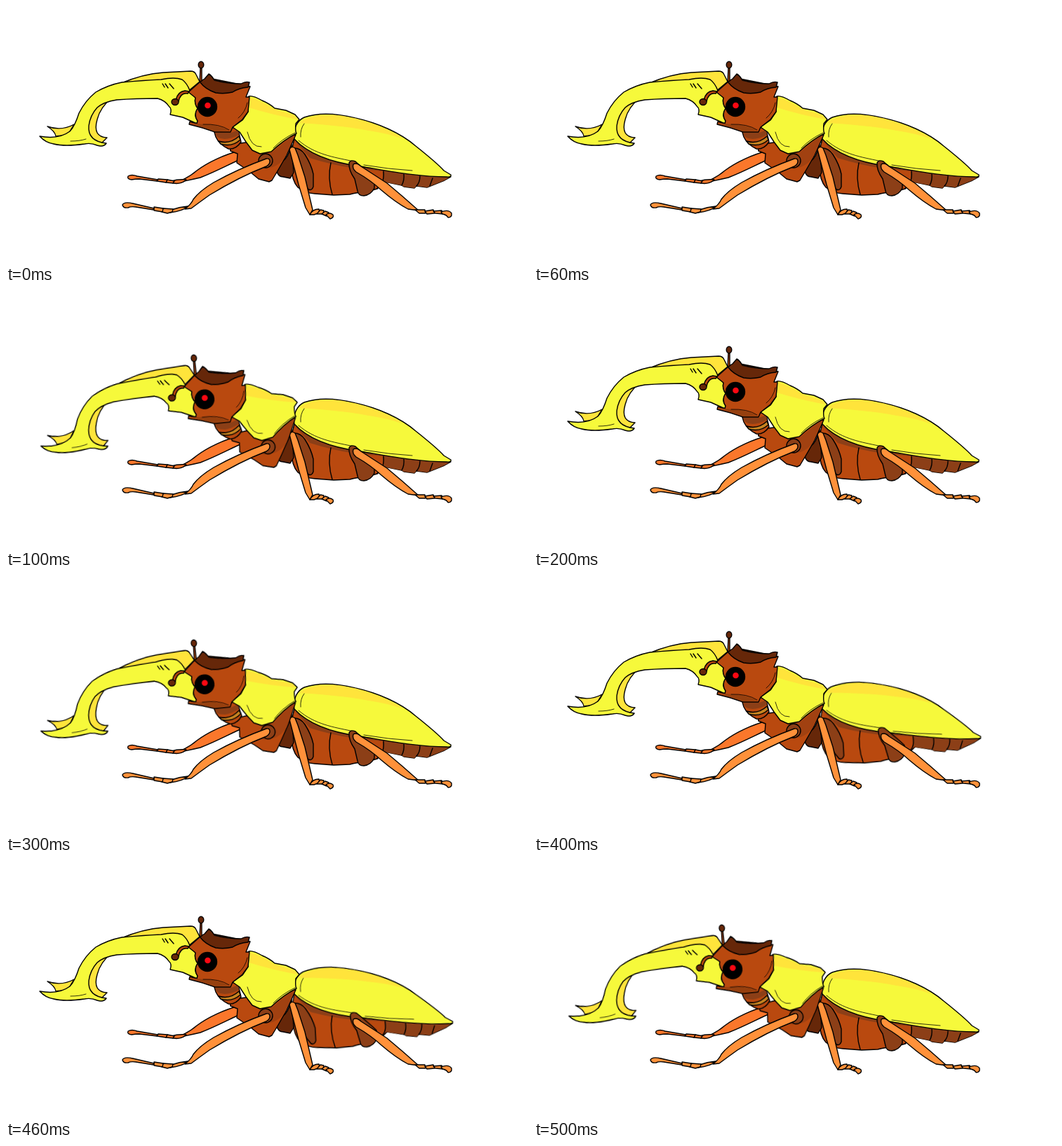
Recreate the animation shown at these times as an HTML page without scripts. Size 744 by 367 pixels, loop 0.6 s.

```html
<!DOCTYPE html>
<html lang="en">
<head>
<meta charset="utf-8">
<title>Beetle</title>
<style>
  html, body { margin: 0; width: 100%; height: 100%; overflow: hidden; background: #fff; }
  svg { display: block; width: 100vw; height: 100vh; }
  path, circle, ellipse { stroke: #000; stroke-width: 1.4; stroke-linejoin: round; stroke-linecap: round; }
  .yellow { fill: #f6f93b; }
  .gold { fill: #ffe43b; }
  .brown { fill: #b9490f; }
  .rust { fill: #8c3f17; }
  .dark { fill: #662709; }
  .leg { fill: #ff913a; }
  .far { fill: #fb772b; }
  .line { fill: none; }
  .thin { fill: none; stroke-width: .8; }
  .flat { stroke: none; }
  .front { animation: nod .2s step-end infinite; }
  .rear { transform-origin: 412px 190px; animation: lift .6s step-end infinite; }
  .front { transform-origin: 0 0; }
  @keyframes nod {
    0% { transform: none; }
    50% { transform: translate(-17.5px, 41.5px) rotate(-6deg); }
  }
  @keyframes lift {
    0% { transform: none; }
    66.667% { transform: rotate(-3.1deg); }
    83.333% { transform: none; }
  }
</style>
</head>
<body>
<svg viewBox="0 0 744 367" preserveAspectRatio="none">
  <!-- far front leg -->
  <g class="far">
    <path d="M332 207C312 212 288 223 272 235Q264 242 252 248L250 251Q264 248 277 245C300 236 318 226 334 219Z"/>
    <path d="M257 248Q245 247 236 250L238 253Q250 255 257 248Z"/>
    <path d="M240 250L230 248 228 252 238 253Z"/>
    <path d="M230 248L217 247 215 250 228 252Z"/>
    <path d="M216 248L187 243Q179 240 174 243Q172 247 179 248Q184 247 190 247L215 250Z"/>
  </g>

  <!-- abdomen -->
  <g class="rear">
    <path class="brown" d="M411 190C404 214 404 246 416 259Q426 267 440 268L467 270 490 269Q500 266 512 266L529 261 540 251 564 256 567 258 582 260 585 257 600 259 625 249 634 244 600 232 500 215Z"/>
    <path class="rust flat" d="M412 193L433 217Q465 227 492 231L537 236V251L564 256 567 258 582 260 585 257 600 259 625 249 633 244 540 230Z"/>
    <path class="line" d="M463 224Q458 246 465 269M538 236Q539 246 536 252L529 261M567 240Q568 249 564 256M590 243Q590 252 585 257M608 246L604 257"/>
    <path class="rust" d="M411 203Q420 203 426 212Q435 226 438 240V258Q436 264 431 262L420 247Z"/>
    <path class="yellow" d="M411 190C408 175 416 163 425 159C445 152 470 153 498 160C530 167 562 181 584 200C604 216 618 228 624 235L634 241Q635 245 628 244C588 244 548 236 505 229C468 224 432 213 411 190Z"/>
    <path class="gold flat" d="M418 167Q436 152 473 156C507 160 543 173 567 190Q545 182 517 178C480 171 448 169 418 167Z"/>
    <path class="thin" d="M425 168Q419 176 420 187M417 192C440 212 468 216 491 221M510 227Q545 233 579 235"/>
    <path class="rust" d="M489 224Q491 219 498 222Q516 238 525 248L525 260Q520 270 510 271Q502 271 501 264L497 247Q488 234 489 224Z"/>
  </g>

  <path class="dark" d="M407 198Q402 217 394 222L386 236Q388 244 395 244L405 246 410 238Z"/>

  <!-- middle and hind legs -->
  <g class="leg">
    <path d="M404 205Q406 199 412 203L416 213 426 244 437 291 433 298 427 288 417 255Z"/>
    <path d="M433 298Q437 290 446 290L447 295 439 298Z"/>
    <path d="M443 297L448 291 453 292 452 297Z"/>
    <path d="M450 297L455 293 460 295 457 300Z"/>
    <path d="M456 298Q461 294 466 298Q468 302 462 304Z"/>
    <path d="M495 226Q500 223 506 229L543 253Q567 273 588 292L573 290Q556 281 535 263Q520 249 499 237Q493 232 495 226Z"/>
    <path d="M583 291L597 291 598 296 589 296Z"/>
    <path d="M597 293L609 291 611 296 600 297Z"/>
    <path d="M609 293L621 292 623 297 612 296Z"/>
    <path d="M620 294Q631 290 635 296Q636 302 630 302Q628 298 622 297Z"/>
  </g>

  <!-- head and thorax -->
  <g class="front">
    <path class="brown" d="M318 198L320 207 330 211 329 224 348 237 360 247 375 251 379 249 388 234 400 213 413 184 380 190Z"/>
    <path class="flat" fill="#a14111" d="M362 211L379 209 412 182 397 217Q384 235 360 231Z"/>
    <path class="brown" d="M296 177L299 187Q304 198 317 204Q328 205 335 194L330 173Z"/>
    <path class="rust flat" d="M298 181L321 181 331 177 332 184Q312 194 301 187Z"/>
    <path d="M303 193Q319 198 332 186L334 191Q322 202 306 197Z" fill="#c78421"/>
    <path class="yellow" d="M346 129Q351 127 365 135Q375 139 383 146L399 149 412 155 418 162 413 168Q412 179 414 182Q396 191 378 208L362 211 351 206 342 194 333 180 323 173 337 163 345 151Z"/>
    <path class="gold flat" d="M348 131Q360 133 382 147L411 156 416 162Q382 156 346 145Z"/>
    <path class="thin" d="M344 180Q349 202 364 201M381 203Q393 190 412 181"/>
    <circle class="rust" cx="370" cy="221" r="10"/>

    <path class="gold" d="M162 111Q195 97 224 95L263 93Q269 93 271 98L276 108 258 123 240 108Z"/>
    <path class="gold" d="M59 172Q79 179 97 169L88 184 71 186Q70 179 59 172Z"/>
    <path class="gold" d="M151 131Q134 145 130 162Q123 187 144 188L137 195 120 193 112 175 124 146Z"/>
    <path class="yellow" d="M48 186Q75 191 91 179Q98 172 104 153Q113 135 128 123Q145 113 165 109Q198 106 221 105Q240 101 251 105Q258 110 262 121L270 131Q268 139 273 146Q267 156 273 164L272 168 252 159 234 155Q237 147 232 143Q227 135 216 132Q185 132 158 134Q139 137 130 145Q120 156 118 171Q116 193 143 196Q139 202 130 199Q121 195 112 197Q84 201 68 197Q56 195 48 186Z"/>
    <path class="thin" d="M92 193Q105 193 114 190"/>
    <path class="line" d="M223 111L226 116M227 111L231 117M233 111L239 118"/>

    <path class="brown" d="M260 123L277 108 294 104 334 112 348 115 342 130 347 130 345 151 337 162 323 173 320 180 298 180 280 174 261 169 262 165 272 168 273 164Q267 156 273 146Q268 139 270 131Z"/>
    <path class="flat" fill="#96400f" d="M263 167L282 169Q302 169 318 178L298 179 280 173Z"/>
    <path class="thin" d="M281 169Q304 168 318 177M344 138Q341 152 331 160"/>
    <path class="dark" d="M276 108L283 104 289 97Q293 99 297 106Q316 111 335 111Q342 107 347 109L345 116Q332 117 323 123Q311 126 299 124Q284 119 276 108Z"/>
    <path class="brown" d="M277 88L276 108 279 107 279 88Z"/>
    <ellipse class="dark" cx="278" cy="84" rx="3.8" ry="4.8"/>
    <path class="brown" d="M242 134Q245 122 255 121L261 122 259 125Q249 123 246 136Z"/>
    <ellipse class="dark" cx="241" cy="137" rx="5" ry="4.5"/>
    <circle cx="287" cy="144" r="13.5"/>
    <circle cx="287.5" cy="142" r="5" fill="#fb0812"/>
  </g>

  <!-- near front leg -->
  <g class="leg">
    <path d="M371 218Q376 217 376 222Q376 226 371 229C340 241 313 256 290 270Q276 280 264 289L255 290Q264 283 267 276Q276 264 296 252Q330 233 371 218Z"/>
    <path d="M259 286Q247 287 236 291L234 295Q252 293 259 286Z"/>
    <path d="M238 290L224 289 222 294 230 296 237 294Z"/>
    <path d="M224 289L211 287 211 292 223 294Z"/>
    <path d="M211 289L181 282Q168 279 166 284Q167 289 174 288Q178 286 185 287L210 291Z"/>
  </g>
</svg>
</body>
</html>
```
